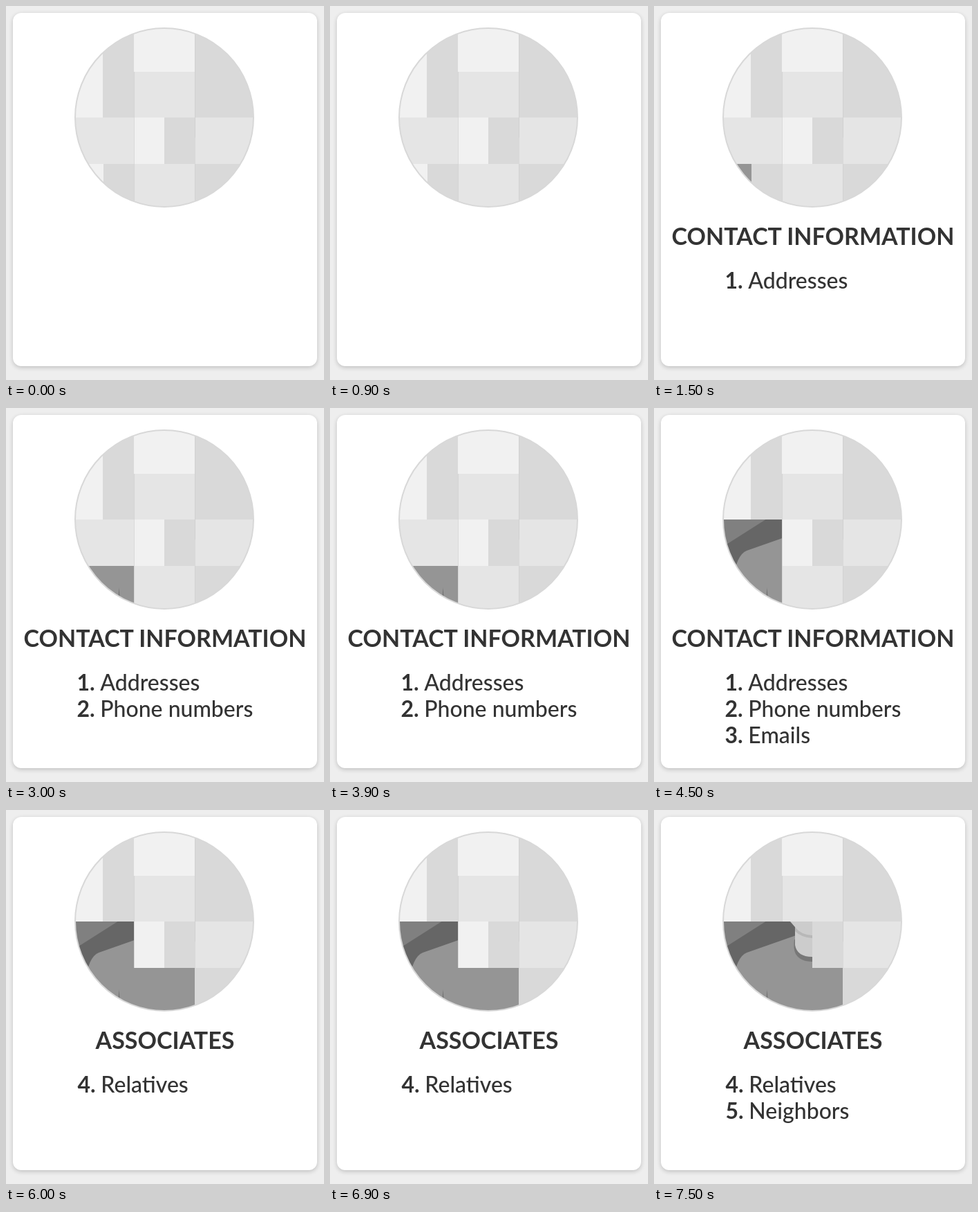
An HTML page that plays this animation: 460 by 540 pixels, repeating every 8000 ms.

```html
<!DOCTYPE html>
<html lang="en">
<head>
<meta charset="utf-8">
<title>Contact card</title>
<style>
  html, body { margin: 0; width: 100%; height: 100%; overflow: hidden; background: #eee; }
  .card {
    position: absolute; left: 10px; top: 10px; width: 440px; height: 510px;
    background: #fff; border-radius: 12px; box-shadow: 0 2px 6px rgba(0, 0, 0, .2);
  }
  svg { position: absolute; left: 0; top: 0; }

  text { font: 500 32px Lato, sans-serif; fill: #333; white-space: pre; }
  .num { font-weight: 700; }
  .title { font-size: 34px; font-weight: 700; text-anchor: middle; }

  .light { fill: #f1f1f1; }
  .mid { fill: #e5e5e5; }
  .dark { fill: #d9d9d9; }
  .seam { fill: #cfcfcf; opacity: .7; }

  /* Each step switches once per loop: --a before it, --b after it. */
  .show { --a: 0; --b: 1; }
  .hide { --a: 1; --b: 0; }
  .s1, .s2, .s3, .s4, .s5 { animation: 8s step-end infinite; }
  .s1 { animation-name: step1; }
  .s2 { animation-name: step2; }
  .s3 { animation-name: step3; }
  .s4 { animation-name: step4; }
  .s5 { animation-name: step5; }
  @keyframes step1 { 0% { opacity: var(--a); } 18.75%, 100% { opacity: var(--b); } }
  @keyframes step2 { 0% { opacity: var(--a); } 37.5%, 100% { opacity: var(--b); } }
  @keyframes step3 { 0% { opacity: var(--a); } 56.25%, 100% { opacity: var(--b); } }
  @keyframes step4 { 0% { opacity: var(--a); } 75%, 100% { opacity: var(--b); } }
  @keyframes step5 { 0% { opacity: var(--a); } 93.75%, 100% { opacity: var(--b); } }
</style>
</head>
<body>
<div class="card"></div>
<svg width="460" height="540" viewBox="0 0 460 540">
  <clipPath id="disc"><circle cx="229" cy="161" r="129"/></clipPath>

  <g clip-path="url(#disc)">
    <!-- portrait -->
    <path fill="#808080" d="M97 161H274V292H97Z"/>
    <path fill="#666" d="M97 202L161.500 161H229V228H97Z"/>
    <path fill="#959595" d="M114 292V250Q119 212 134 206L204 181.500H274V292Z"/>
    <path fill="#959595" d="M97 228H274V292H97Z"/>
    <path fill="#707070" d="M163.500 259L164.500 273H162.500Z"/>
    <path fill="#777" d="M203 187Q201 200 205 208Q212 219 229 219V187Z"/>
    <path fill="#ccc" d="M197 161H229V212Q207 212 204 195V169Z"/>
    <path fill="#b8b8b8" d="M204 169Q212 180 229 181V185Q213 184 204 175Z"/>

    <!-- tiles -->
    <path class="light" d="M97 30H141V161H97ZM185 30H273V95H185Z"/>
    <path class="dark" d="M141 30H185V161H141ZM273 30H361V161H273ZM229 161H274V228H229ZM273 228H361V292H273Z"/>
    <path class="mid" d="M185 95H273V161H185ZM274 161H361V228H274Z"/>
    <path class="seam" d="M140 66H141V161H140ZM185 95H186V161H185ZM273 40H274V190H273Z"/>
    <rect class="light hide s1" x="97" y="228" width="44" height="64"/>
    <rect class="dark hide s2" x="141" y="228" width="44" height="64"/>
    <rect class="mid hide s3" x="97" y="161" width="88" height="67"/>
    <g class="hide s4">
      <path class="mid" d="M185 228H273V292H185Z"/>
      <path class="seam" d="M185 228H186V292H185ZM273 228H274V292H273Z"/>
    </g>
    <g class="hide s5">
      <path class="light" d="M185 161H229V228H185Z"/>
      <path class="seam" d="M185 161H186V228H185Z"/>
    </g>
  </g>
  <circle cx="229" cy="161" r="129" fill="none" stroke="#d8d8d8" stroke-width="2"/>

  <g class="hide s4">
    <g class="show s1">
      <text class="title" x="230" y="345">CONTACT INFORMATION</text>
      <text x="102.400" y="408"><tspan class="num">1. </tspan>Addresses</text>
    </g>
    <text class="show s2" x="102.400" y="446"><tspan class="num">2. </tspan>Phone numbers</text>
    <text class="show s3" x="102.400" y="484"><tspan class="num">3. </tspan>Emails</text>
  </g>
  <g class="show s4">
    <text class="title" x="230" y="345">ASSOCIATES</text>
    <text x="103.400" y="408"><tspan class="num">4. </tspan>Relatives</text>
  </g>
  <text class="show s5" x="103.400" y="446"><tspan class="num">5. </tspan>Neighbors</text>
</svg>
</body>
</html>
```
